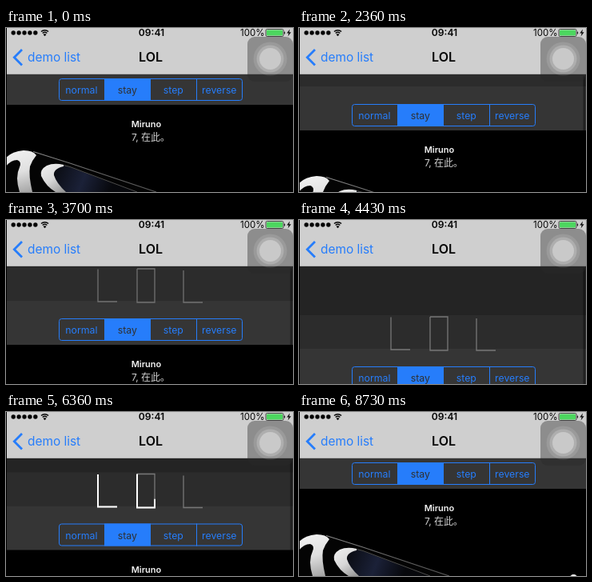
An HTML page with a canvas for the animation above (8.83 s loop, 359x205 px).

```html
<!DOCTYPE html>
<html lang="en">
<head>
<meta charset="utf-8">
<title>Pull to refresh</title>
<style>
html, body { margin: 0; width: 100%; height: 100%; overflow: hidden; background: #000; }
canvas { display: block; }
</style>
</head>
<body>
<canvas id="stage" width="359" height="205"></canvas>
<script>
const g = document.getElementById('stage').getContext('2d');
const LOOP = 8830, START = 880, STEP = 147.9;
const BLUE = '#267dfb', NAV = '#cfcfcf';
const SANS = 'Inter, Roboto, "Noto Sans CJK SC", "Noto Sans CJK", sans-serif';

// Pull distance over time: [ms, px]
const PULL = [[0, 0], [800, 0], [880, 3], [1620, 20], [2063, 26], [2359, 32], [3110, 43],
  [3690, 60], [4429, 120], [4600, 120], [4900, 76.5], [7860, 76.5], [8150, 10], [8300, 0], [LOOP, 0]];
const FILL_START = 4900, FILL_END = 7650;

// Letter strokes, relative to the pull distance
const LETTERS = [
  [[115, 1.5], [115, 42], [139, 42]],
  [[164, 1], [164, 43], [186, 43], [186, 1], [164, 1]],
  [[222, 3], [222, 43], [246, 43]]
];

const clamp = x => Math.max(0, Math.min(1, x));

function pullAt(t) {
  const i = PULL.findIndex(k => k[0] > t);
  const [t0, a] = PULL[i - 1], [t1, b] = PULL[i];
  return a + (b - a) * (t - t0) / (t1 - t0);
}

function box(x, y, w, h, color) {
  g.fillStyle = color;
  g.fillRect(x, y, w, h);
}

function round(x, y, w, h, r, color) {
  g.beginPath();
  g.roundRect(x, y, w, h, r);
  g.fillStyle = color;
  g.fill();
}

function outline(x, y, w, h, r, color, width = 1) {
  g.beginPath();
  g.roundRect(x, y, w, h, r);
  g.strokeStyle = color;
  g.lineWidth = width;
  g.stroke();
}

function dot(x, y, r, color) {
  g.beginPath();
  g.arc(x, y, r, 0, 7);
  g.fillStyle = color;
  g.fill();
}

function line(points, color, width) {
  g.beginPath();
  points.forEach(p => g.lineTo(...p));
  g.strokeStyle = color;
  g.lineWidth = width;
  g.stroke();
}

function shape(path, color) {
  g.fillStyle = color;
  g.fill(new Path2D(path));
}

function fade(x0, y0, x1, y1, ...colors) {
  const f = g.createLinearGradient(x0, y0, x1, y1);
  colors.forEach((c, i) => f.addColorStop(i / (colors.length - 1), c));
  return f;
}

function text(s, x, y, size, color, weight = 400, align = 'center') {
  g.font = `${weight} ${size}px ${SANS}`;
  g.textAlign = align;
  g.fillStyle = color;
  g.fillText(s, x, y);
}

function letters(t, pull) {
  const progress = 3 * clamp((t - FILL_START) / (FILL_END - FILL_START));
  g.save();
  g.translate(0, pull);
  g.globalAlpha = clamp((pull - 36) / 26);
  LETTERS.forEach((points, i) => {
    line(points, '#777', 1.3);
    const part = clamp(progress - i);
    if (!part) return;
    const length = points.slice(1).reduce((sum, p, j) =>
      sum + Math.hypot(p[0] - points[j][0], p[1] - points[j][1]), 0);
    g.setLineDash([length * part, length]);
    line(points, '#fff', 2);
    g.setLineDash([]);
  });
  g.restore();
}

function segments() {
  box(123, 63, 58, 28, BLUE);
  outline(66.5, 63.5, 229, 27, 3, BLUE);
  line([[238.5, 63], [238.5, 91]], BLUE, 1);
  ['normal', 'stay', 'step', 'reverse'].forEach((s, i) =>
    text(s, 94.3 + 57.5 * i, 82, 12.3, i === 1 ? '#303030' : BLUE));
}

function phone() {
  // Body and its lit edge
  shape('M0 162 Q8 153 28 153 L188 205 H0 Z', '#040404');
  line([[34, 154.5], [80, 169], [188, 205]], fade(34, 154, 188, 205, '#8a8a8a', '#666', '#555'), 1.2);
  shape('M0 162 Q8 154 22 153 Q34 153 38 159 Q33 165 30 173 Q28 184 33 205 H17 Q11 186 17 174 Q20 167 14 165 Q6 165 0 173 Z',
    fade(10, 155, 24, 205, '#f0f0f0', '#e0e0e0', '#a8a8a8'));
  // Lens ring with dark glass
  shape('M60 174 Q68 169 80 174 L162 205 H70 Q58 188 60 174 Z', fade(62, 178, 130, 205, '#0b0d14', '#1b2138', '#07080c'));
  line([[70, 171], [80, 173.5], [164, 205]], '#4c4c4c', 1);
  shape('M72 171 Q60 168 51 172 Q42 177 44 185 Q50 198 62 205 H75 Q63 194 60 184 Q59 176 72 173 Z',
    fade(48, 172, 70, 205, '#ededed', '#d8d8d8', '#999'));
}

function content(t, pull) {
  box(0, 57, 359, 148, '#242424');
  box(0, pull - 1, 359, 42, '#2c2c2c');
  box(0, pull + 41, 359, 60, '#353535');
  letters(t, pull);
  g.save();
  g.translate(0, pull);
  segments();
  box(0, 96, 359, 110, '#000');
  text('Miruno', 175.5, 124, 11, '#f2f2f2', 600);
  text('7, 在此。', 157, 141, 12, '#d0d0d0', 400, 'left');
  phone();
  g.restore();
  if (pull) box(355.5, 60, 2.5, 145, 'rgba(0,0,0,.4)');
  if (t > 8600) dot(343.5, 208, 5, '#eee');
}

function statusBar() {
  for (let i = 0; i < 5; i++) dot(9.2 + 6.9 * i, 6, 2.7, '#050505');
  [6.8, 4.2].forEach(r => {
    g.beginPath();
    g.arc(48.5, 9.6, r, -2.3, -0.84);
    g.strokeStyle = '#050505';
    g.lineWidth = 1.5;
    g.stroke();
  });
  shape('M48.5 10.3 L46.5 8 Q48.5 6.5 50.5 8 Z', '#050505');
  text('09:41', 182, 10.3, 12.1, '#050505', 600);
  text('100%', 293, 10.3, 11.5, '#050505', 400, 'left');
  outline(325, 1.5, 22, 9, 1.5, '#222', 0.8);
  round(326, 2.5, 20, 7, 1, '#4cd65f');
  round(347.8, 4.5, 1.3, 3, 0.6, '#222');
  shape('M355 1.5 L351.2 6.6 H353.6 L352.6 10.5 L356.6 5.3 H354.2 Z', '#111');
}

function navBar() {
  box(0, 0, 359, 57, NAV);
  box(0, 57, 359, 1, '#b0b0b0');
  statusBar();
  line([[20, 27], [10.3, 36.7], [20, 46.4]], BLUE, 2.8);
  text('demo list', 27, 42, 15.4, BLUE, 400, 'left');
  text('LOL', 181, 42, 16, '#050505', 600);
}

function touchButton() {
  round(302, 11, 57, 56, 9, 'rgba(40,40,40,.4)');
  dot(330.5, 38.5, 21, 'rgba(255,255,255,.11)');
  dot(330.5, 38.5, 17, 'rgba(255,255,255,.2)');
  dot(330.5, 38.5, 13.5, '#c9c9c9');
}

function draw(now) {
  let t = now % LOOP;
  // The screen advances in hard steps
  t = t < START ? 0 : START + Math.floor((t - START) / STEP) * STEP;
  content(t, pullAt(t));
  navBar();
  touchButton();
  box(0, 0, 1, 205, '#000');
  requestAnimationFrame(draw);
}
requestAnimationFrame(draw);
</script>
</body>
</html>
```
